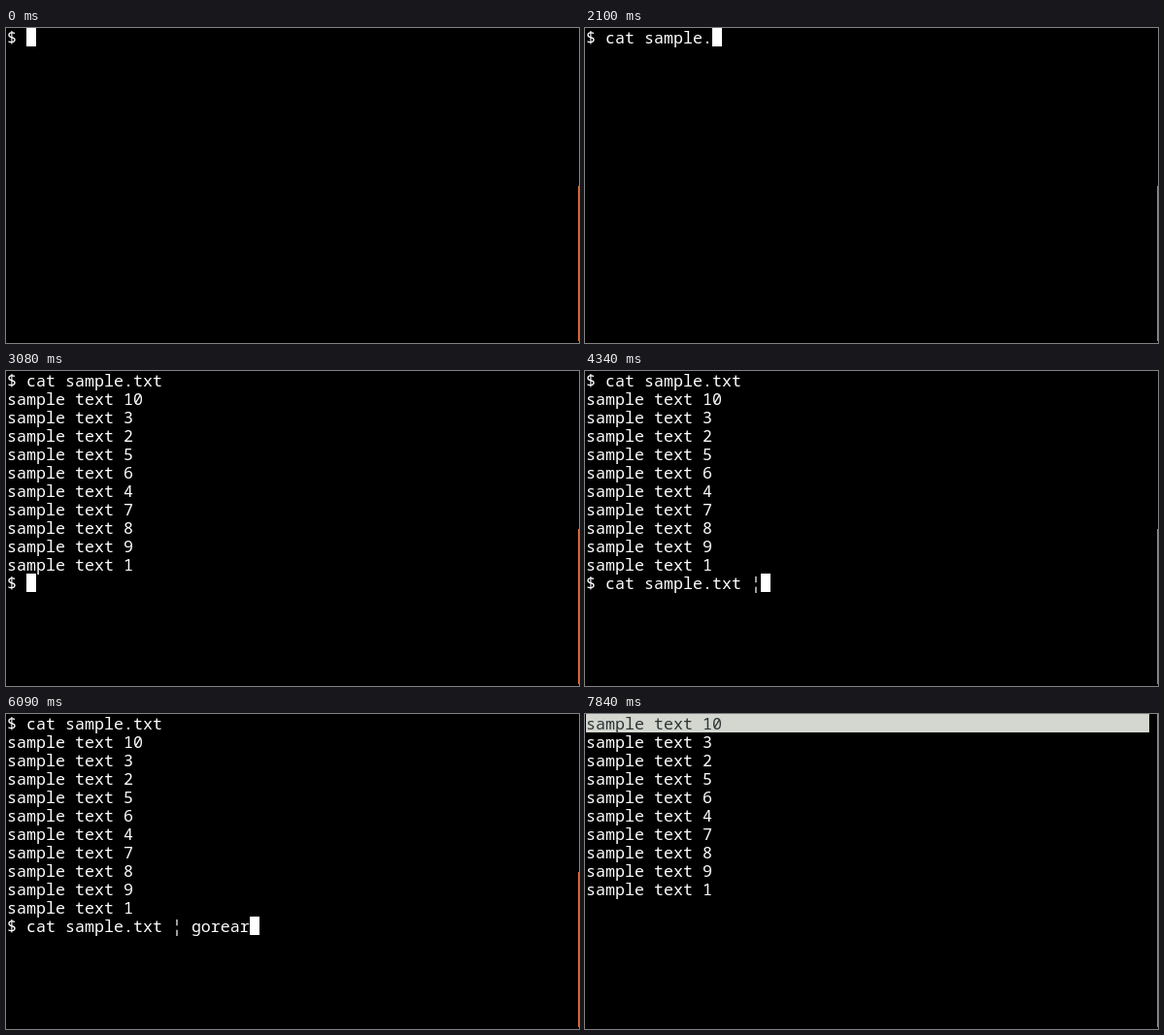
An HTML page that plays this animation: 590 px wide and 325 px high, repeating every 8000 ms.

```html
<!DOCTYPE html>
<html lang="en">
<head>
<meta charset="utf-8">
<title>Terminal session</title>
<style>
html, body { margin: 0; width: 100%; height: 100%; overflow: hidden; background: #000; }
#stage { position: relative; width: 590px; height: 325px; overflow: hidden; background: #000; color: #fff; }
#stage, pre { font: 16.667px/19px "Noto Sans Mono", "DejaVu Sans Mono", monospace; font-variant-ligatures: none; }
pre { position: absolute; left: 1px; top: 0; margin: 0; }
#cursor { position: absolute; width: 10px; height: 19px; background: #fff; color: #000; }
#bar { position: absolute; left: 589px; top: 163px; bottom: 2px; width: 1px; background: #d9693a; }
#bar.idle { background: #888; }
.picking #bar { top: 0; }
.picking pre::first-line { color: #2e3436; }
#selected { position: absolute; left: 1px; top: 0; width: 580px; height: 19px; background: #d3d7cf; visibility: hidden; }
.picking #selected { visibility: visible; }
</style>
</head>
<body>
<div id="stage">
  <div id="selected"></div>
  <pre id="text"></pre>
  <div id="cursor"></div>
  <div id="bar"></div>
</div>
<script>
const LOOP = 8000, TICK = 70, BLINK = 500, CELL = 10, ROW = 19;
const [stage, text, cursor, bar] = ["stage", "text", "cursor", "bar"].map(id => document.getElementById(id));
const list = [10, 3, 2, 5, 6, 4, 7, 8, 9, 1].map(n => "sample text " + n);

// Bursts of evenly spaced keys: text, first key, last key
const keys = [
  ["", -150],
  ["cat sa", 835, 1325], ["mple", 1395, 1815], [".", 2090], ["txt", 2655, 2795], ["\n", 3065],
  ["cat sample.txt", 3705], [" ", 3985], ["¦ ", 4335, 4475],
  ["gore", 4895, 5245], ["ar", 5945, 6080], ["range", 6790, 7135], ["\n", 7340]
].flatMap(([chars, from, to = from]) =>
  (chars ? [...chars] : [""]).map((char, i, all) =>
    ({ char, time: from + (to - from) * i / Math.max(1, all.length - 1) })));

function draw(t) {
  const now = Math.floor(t / TICK) * TICK;
  const done = keys.filter(k => k.time <= now);
  const typed = done.map(k => k.char).join("").split("\n");
  const idle = now - done[done.length - 1].time >= BLINK;
  const picking = typed.length > 2;

  const lines = typed.length === 1 ? ["$ " + typed[0]]
    : picking ? list
    : ["$ " + typed[0], ...list, "$ " + typed[1]];
  const row = picking ? 0 : lines.length - 1;
  const col = picking ? 0 : lines[row].length;

  text.textContent = lines.join("\n");
  stage.classList.toggle("picking", picking);
  bar.classList.toggle("idle", now >= 6580);
  cursor.hidden = idle;
  cursor.textContent = lines[row][col] || "";
  cursor.style.left = 1 + col * CELL + "px";
  cursor.style.top = row * ROW + "px";
}

const start = performance.now();
function tick() {
  draw((performance.now() - start) % LOOP);
  requestAnimationFrame(tick);
}
tick();
</script>
</body>
</html>
```
